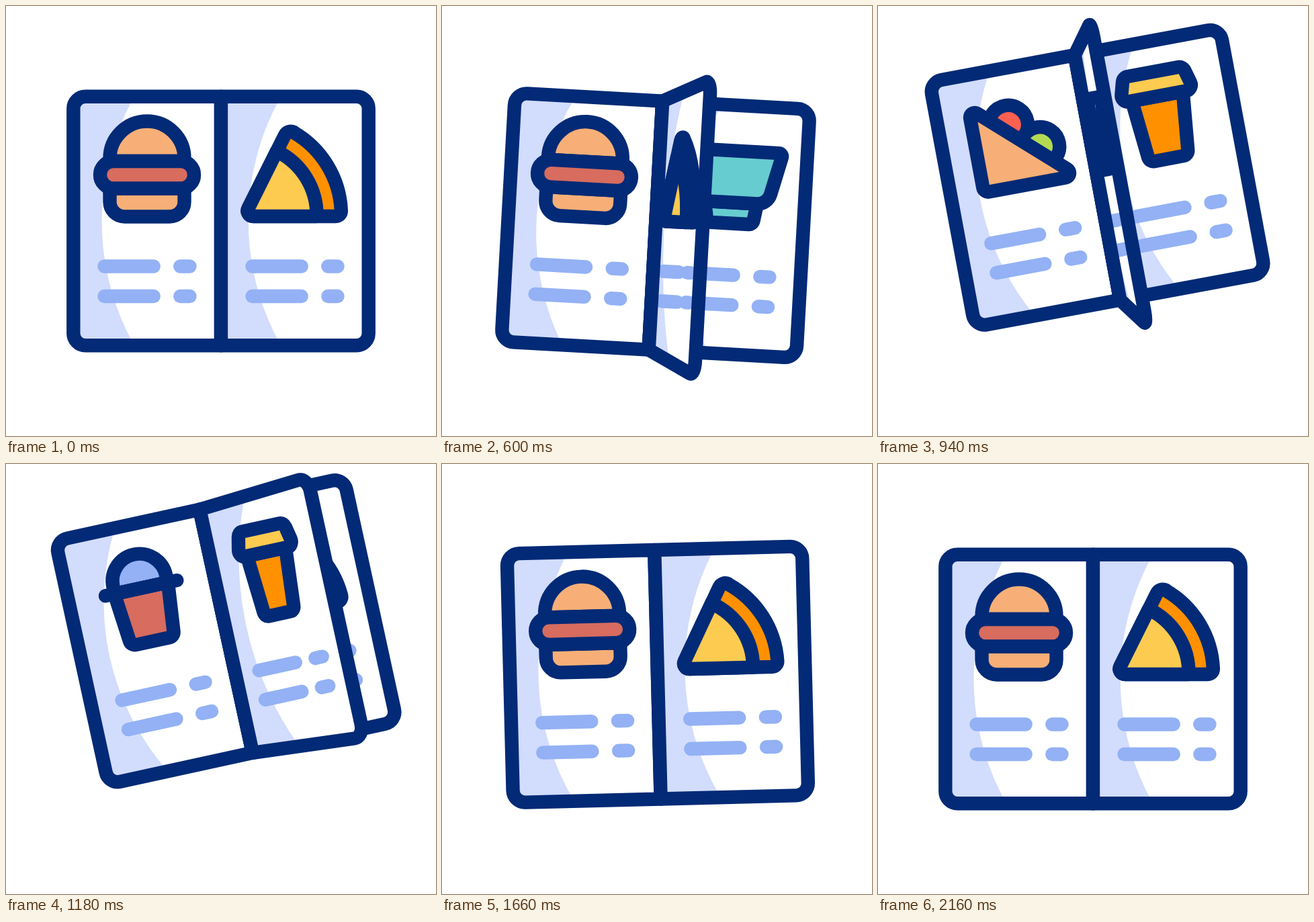
Animation, 640 px wide and 640 px high, one loop 2.42 s. Source, as an HTML page with a canvas:

```html
<!DOCTYPE html>
<html lang="en">
<head>
<meta charset="utf-8">
<title>Menu</title>
<style>
  html, body { margin: 0; width: 100%; height: 100%; overflow: hidden; background: #fff; }
  canvas { display: block; }
</style>
</head>
<body>
<canvas id="stage" width="640" height="640"></canvas>
<script>
const ctx = document.getElementById('stage').getContext('2d');
const LOOP = 2420, MID = 320;
const NAVY = '#032a76', SHADE = '#d2dcfd', BLUE = '#93b1f4', BUN = '#f7af77',
      RED = '#d76c5f', CORAL = '#ff6151', GREEN = '#b3da52', TEAL = '#67cccf',
      YELLOW = '#fdcb50', ORANGE = '#ff9100';

// Horizontal squash of the page being drawn; strokes keep their width.
let squash = 1;

function trace(path, k = squash) {
  ctx.save();
  ctx.translate(MID, 0);
  ctx.scale(Math.abs(k) < 0.001 ? 0.001 : k, 1);
  ctx.translate(-MID, 0);
  ctx.beginPath();
  path();
  ctx.restore();
}

function ink(path, fill, stroke = NAVY) {
  trace(path);
  if (fill) { ctx.fillStyle = fill; ctx.fill(); }
  if (stroke) { ctx.strokeStyle = stroke; ctx.stroke(); }
}

// Closed polygon of [x, y, corner radius].
const poly = (...pts) => () => {
  const last = pts[pts.length - 1];
  const mid = [(last[0] + pts[0][0]) / 2, (last[1] + pts[0][1]) / 2];
  ctx.moveTo(...mid);
  pts.forEach(([x, y, r = 0], i) => {
    const next = pts[i + 1] || mid;
    if (r) ctx.arcTo(x, y, next[0], next[1], r);
    else ctx.lineTo(x, y);
  });
  ctx.closePath();
};

const circle = (x, y, r) => () => ctx.arc(x, y, r, 0, Math.PI * 2);

// Trapezoid symmetric about cx: half widths at top and bottom.
const cup = (cx, y0, h0, r0, y1, h1, r1) =>
  poly([cx - h0, y0, r0], [cx + h0, y0, r0], [cx + h1, y1, r1], [cx - h1, y1, r1]);

const dome = (cx, cy, r, base) => () => {
  ctx.moveTo(cx - r, base);
  ctx.lineTo(cx - r, cy);
  ctx.arc(cx, cy, r, Math.PI, 0);
  ctx.lineTo(cx + r, base);
  ctx.closePath();
};

const line = (x0, x1, y) => () => { ctx.moveTo(x0, y); ctx.lineTo(x1, y); };

function burger() {
  ink(dome(210, 227, 55.5, 231), BUN);
  ink(cup(210, 271.5, 55.5, 0, 313.5, 55.5, 22), BUN);
  ink(cup(210, 231, 70, 20, 271.5, 70, 20), RED);
}

function wrap() {
  ink(circle(204, 218.5, 29), CORAL);
  ink(circle(244.5, 259, 29), GREEN);
  ink(poly([149.8, 183, 7], [291.7, 311.5, 7], [149.8, 311.5, 8]), BUN);
}

function sundae() {
  ink(dome(210, 219.5, 40.3, 230.5), BLUE);
  ink(cup(210, 230.5, 40.8, 0, 311.3, 32.8, 8), RED);
  ink(line(155.5, 264.5, 230.5));
}

function pizza() {
  const cx = 357, cy = 311;
  ink(() => {
    ctx.moveTo(420, 313);
    ctx.arcTo(354.6, 313, 419.4, 183.4, 8);
    ctx.arcTo(419.4, 183.4, 432.9, 190, 10);
    ctx.arc(cx, cy, 142, -1.045, -0.045);
    ctx.arcTo(499, 313, 480, 313, 8);
    ctx.closePath();
  }, ORANGE);
  ink(() => {
    ctx.moveTo(361, 308);
    ctx.arc(cx, cy, 105.5, -1.11, 0.01);
    ctx.closePath();
  }, YELLOW, null);
  ink(() => ctx.arc(cx, cy, 105.5, -1.11, 0.01));
  ink(() => {
    ctx.moveTo(403, 216);
    ctx.lineTo(361.9, 298.4);
    ctx.arcTo(354.6, 313, 420, 313, 8);
    ctx.lineTo(462, 313);
  });
}

function bowl() {
  ink(cup(430, 279.5, 39, 0, 310.7, 34, 7), TEAL);
  ink(cup(430, 202.5, 73.5, 5, 279.5, 54.5, 20), TEAL);
}

function coffee() {
  ink(cup(429.8, 217.3, 38.6, 0, 311.7, 29.4, 8), ORANGE);
  ink(cup(429.8, 180.3, 45.2, 9, 217.3, 55.3, 9), YELLOW);
}

const lefts = [burger, wrap, sundae, burger];
const rights = [pizza, bowl, coffee, pizza];

// k runs from 1 (flat on the right) to -1 (flat on the left).
function page(k, icon) {
  const right = k > 0;
  const lift = 52 * (1 - Math.abs(k));
  const sheet = () => {
    ctx.moveTo(MID, 134.7);
    ctx.arcTo(539.7, 134.7 - lift, 539.7, 320, 18);
    ctx.arcTo(539.7, 505.3 + lift, MID, 505.3, 18);
    ctx.lineTo(MID, 505.3);
    ctx.closePath();
  };
  squash = Math.abs(k);

  ctx.save();
  trace(sheet, k);
  ctx.fillStyle = SHADE;
  ctx.fill();
  ctx.clip();
  ink(circle(right ? 738.7 : 520.5, 320, 378), '#fff', null);
  ctx.restore();

  const dx = right ? 220 : 0;
  for (const y of [387.5, 432]) {
    ink(line(146.5 + dx, 219.7 + dx, y), null, BLUE);
    ink(line(259.3 + dx, 273.5 + dx, y), null, BLUE);
  }
  icon();

  trace(sheet, k);
  ctx.strokeStyle = NAVY;
  ctx.stroke();
}

const smooth = u => u * u * (3 - 2 * u);

// Unit bezier with handles (x1, 0) and (x2, 1).
const bezier = (x1, x2) => u => {
  let lo = 0, hi = 1, s = 0.5;
  for (let i = 0; i < 24; i++) {
    s = (lo + hi) / 2;
    const x = 3 * s * (1 - s) * ((1 - s) * x1 + s * x2) + s * s * s;
    if (x < u) lo = s; else hi = s;
  }
  return smooth(s);
};

// Keys: [time, value, easing towards the next key].
const tilt = [[200, 0], [480, 8, bezier(0.21, 0.21)], [1200, -12.3], [1480, 6.1], [1760, -4.5], [2160, 0]];
const drop = [[200, 0], [458, 60, bezier(0.17, 0.15)], [1165, -71.5], [1450, 47.5], [1730, -16.5], [2160, 0]];

function track(keys, t) {
  if (t <= keys[0][0]) return keys[0][1];
  for (let i = 1; i < keys.length; i++) {
    const [t0, a, ease = smooth] = keys[i - 1], [t1, b] = keys[i];
    if (t < t1) return a + (b - a) * ease((t - t0) / (t1 - t0));
  }
  return keys[keys.length - 1][1];
}

const FLIP_START = 478, FLIP = 320;

function draw(t) {
  ctx.setTransform(1, 0, 0, 1, 0, 0);
  ctx.fillStyle = '#fff';
  ctx.fillRect(0, 0, 640, 640);
  ctx.lineWidth = 20.4;
  ctx.lineCap = ctx.lineJoin = 'round';

  ctx.translate(MID, 284 + track(drop, t));
  ctx.rotate(track(tilt, t) * Math.PI / 180);
  ctx.translate(-MID, -284);

  const turn = (t - FLIP_START) / FLIP;
  if (turn <= 0 || turn >= 3) {
    page(-1, lefts[0]);
    page(1, rights[0]);
    return;
  }
  const i = Math.floor(turn), u = turn - i;
  const k = 1 - 2 * (0.2 * u + 0.8 * smooth(u));
  page(-1, lefts[i]);
  page(1, rights[i + 1]);
  page(k, k > 0 ? rights[i] : lefts[i + 1]);
}

const start = performance.now();
function tick(now) {
  draw(Math.max(0, now - start) % LOOP);
  requestAnimationFrame(tick);
}
draw(0);
requestAnimationFrame(tick);
</script>
</body>
</html>
```
